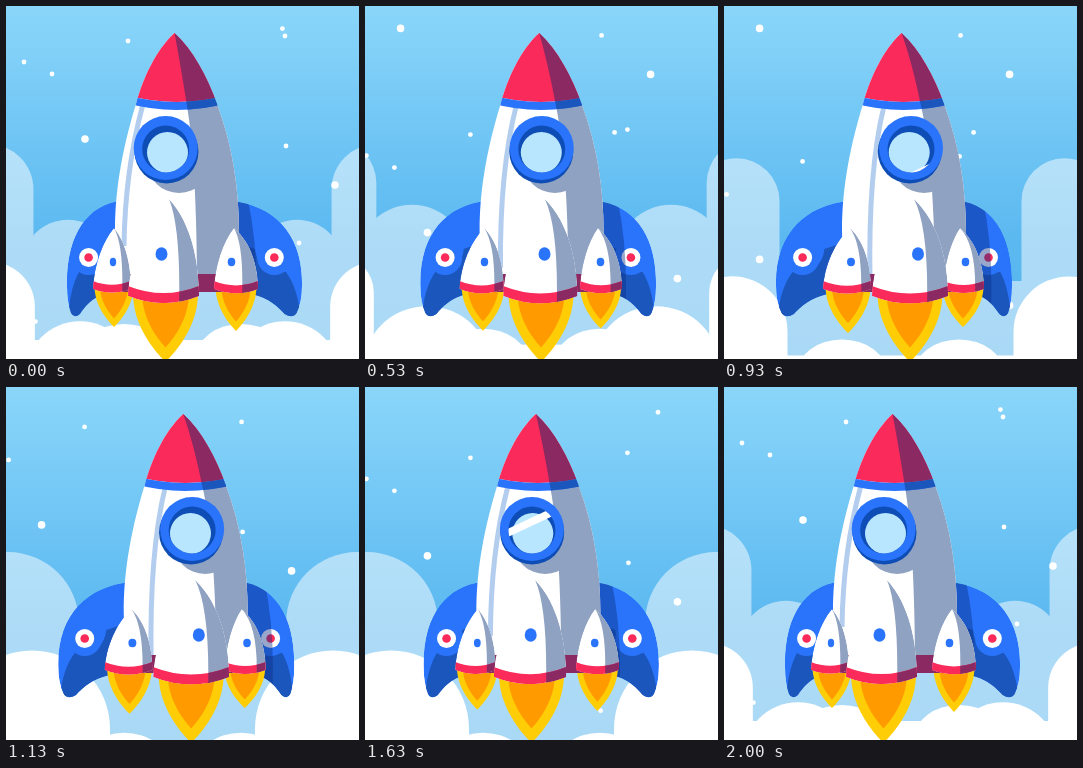
Write an HTML page that moves like this. It is 353x353 px and loops after 2030 ms.

```html
<!DOCTYPE html>
<html lang="en">
<head>
<meta charset="utf-8">
<title>Rocket</title>
<style>
  html, body { margin: 0; width: 100%; height: 100%; overflow: hidden; background: #6fc4f5; }
  svg { display: block; width: 100vw; height: 100vh; }
</style>
</head>
<body>
<svg id="stage" viewBox="0 0 353 353"></svg>
<script>
const SIZE = 353, LOOP = 2030, FRAMES = 61, CLOUD_CYCLE = 15;
const TILES = 5, TILE_HEIGHT = 231, STAR_STRIP = TILES * TILE_HEIGHT;
const C = {
  blue: '#2a74fb', navy: '#1b56bd', rim: '#0d4db5', glass: '#b9e6ff', shade: '#8fa2c2', stripe: '#b3cdef',
  red: '#fa2a5a', wine: '#8b2a62', yellow: '#ffcd05', orange: '#ff9a00', white: '#fff'
};

const lerp = (a, b, u) => a + (b - a) * u;
const ease = u => (1 - Math.cos(Math.PI * Math.min(1, Math.max(0, u)))) / 2;
const wrap = (v, n) => ((v % n) + n) % n;

const path = (d, fill, more = '') => `<path d="${d}" fill="${fill}" ${more}/>`;
const line = (d, color, width) => path(d, 'none', `stroke="${color}" stroke-width="${width}"`);
const oval = (x, y, rx, fill, ry = rx) => `<ellipse cx="${x}" cy="${y}" rx="${rx}" ry="${ry}" fill="${fill}"/>`;
const box = (y, h, fill) => `<rect y="${y}" width="${SIZE}" height="${h}" fill="${fill}"/>`;
const clip = (id, shape) => `<clipPath id="${id}">${shape}</clipPath>`;
const clipped = (id, inner) => `<g clip-path="url(#${id})">${inner}</g>`;

// One cluster of stars, repeated up the strip with a slow sway.
const cluster = [
  [279, 30, 2.4], [122, 35, 2.4], [18, 56, 2.4], [46, 68, 2.4],
  [79, 133, 3.8], [280, 140, 2.4], [329, 179, 3.8], [293, 237, 2.4]
];

function starField(shift) {
  let out = '';
  for (let tile = 0; tile < TILES; tile++) {
    const sway = 24 * (1 - Math.cos(2 * Math.PI * tile / TILES));
    for (const [x, y, r] of cluster) {
      const fall = wrap(y + sway - tile * TILE_HEIGHT + shift + 10, STAR_STRIP) - 10;
      if (fall < SIZE + 10) out += oval(x - sway, fall, r, C.white);
    }
  }
  return out;
}

// A puff swells from under the rocket and drifts up and outwards, on both sides.
function dome(x, y, r) {
  const side = cx => path(`M${cx - r},${y} A${r},${r} 0 0 1 ${cx + r},${y} V400 H${cx - r}Z`, C.white);
  return r > 0 ? side(x) + side(SIZE - x) : '';
}

function backPuff(step, delay, size, lift) {
  const age = wrap(step - delay, CLOUD_CYCLE);
  return dome(122 - 15 * age, 284 - 6 * age - lift, size * Math.sin(Math.PI * age / 18));
}

function frontPuff(step, delay, size) {
  const age = wrap(step - delay, CLOUD_CYCLE);
  return dome(122 - 12 * age, 380 - .6 * age * age, size * Math.sin(Math.PI * age / 16));
}

function backClouds(step) {
  return `<g opacity=".5">${backPuff(step, -4, 72, 0)}${backPuff(step, 2.7, 73, 0)}` +
    `${backPuff(step, 5.7, 45, 45)}${box(275, 100, C.white)}</g>`;
}

function frontClouds(step) {
  const sink = 14 * (1 - Math.cos(4 * Math.PI * step / CLOUD_CYCLE));
  return frontPuff(step, -4, 78) + frontPuff(step, 3.5, 58) +
    [118, SIZE - 118].map(x => oval(x, 352 + sink, 45, C.white, 34)).join('') + box(334 + sink, 60, C.white);
}

function flame(x, w, y, tip) {
  const drop = (half, end) => {
    const h = end - y;
    return `M${x - half},${y} C${x - half},${y + h * .45} ${x - half * .42},${y + h * .8} ${x},${end}` +
      ` C${x + half * .42},${y + h * .8} ${x + half},${y + h * .45} ${x + half},${y}Z`;
  };
  return path(drop(w, tip), C.yellow) + path(drop(w * .72, lerp(y, tip, .79)), C.orange);
}

// x, top: the tip; l, r: the base; split: where the shade meets the base
function booster(id, x, top, l, r, split, base, bandHeight) {
  const h = base - top, mid = (l + r) / 2, sag = (r - l) * .2;
  const rightEdge = `C${r},${base - h * .35} ${lerp(x, r, .75)},${top + h * .25} ${x},${top}Z`;
  const shape = `M${x},${top} C${lerp(x, l, .55)},${top + h * .22} ${l + 1},${base - h * .38} ${l},${base} ` +
    `Q${mid},${base + sag} ${r},${base} ${rightEdge}`;
  const shade = `M${x},${top} Q${split + 2},${top + h * .3} ${split},${base + sag} L${r},${base + sag} V${base} ${rightEdge}`;
  const upper = base - bandHeight;
  const band = `M${l},${upper} Q${mid},${upper + sag} ${r},${upper} V${base} Q${mid},${base + sag} ${l},${base}Z`;
  return clip(id, path(shape, C.white)) + clip(id + 'Shade', path(shade, C.white)) +
    clipped(id, path(shape, C.white) + path(shade, C.shade) + path(band, C.red) +
      clipped(id + 'Shade', path(band, C.wine)));
}

const finShape = 'M114,195 C82,199 60,228 61,280 Q61,296 65,307 Q68,313 74,308 C82,296 90,288 114,284Z';
const finShade = 'M62,312 Q64,282 73,266 Q94,268 96,243 L120,232 V320Z';

// The fin is drawn from x 61 to 108, then stretched between its outer and inner edge.
function fin(id, outer, inner, hub) {
  const k = (inner - outer) / 47;
  const place = `transform="matrix(${k} 0 0 1 ${outer - 61 * k} 0)"`;
  return clip(id, path(finShape, C.white, place)) +
    clipped(id, path(finShape, C.blue, place) + path(finShade, C.navy, place) + oval(hub, 252, 17, C.blue)) +
    oval(hub, 251.5, 9.5, C.white) + oval(hub, 251.5, 4.3, C.red);
}

function fins(mix) {
  const edge = mix(249, 266);
  return fin('leftFin', mix(61, 52), mix(108, 117), mix(82.6, 78.6)) +
    fin('rightFin', mix(296, 288), mix(233, 242), mix(268.3, 264.5)) +
    clipped('rightFin', path(`M200,190 H${edge - 8} Q${edge + 5},245 ${edge},320 H200Z`, '#0a2f80', 'opacity=".42"'));
}

function body(mix) {
  const slide = `transform="translate(${mix(0, 9)} 0)"`;
  const shape = 'M168.5,27 C150,44 137,72 130,98 C114,150 109,190 109,225 Q109,260 116,286 ' +
    'L226,286 Q233,260 233,225 C233,185 227,140 211,98 C201,70 187,44 168.5,27Z';
  const tip = mix(168.5, 177.5), split = mix(181, 197);
  const shade = `M${tip},20 V27 Q${mix(174, 188)},56 ${split},100 Q${mix(191, 211)},160 ${mix(191, 211)},290 H260 V20Z`;
  const nose = 'M120,0 H222 V89 Q170,103 120,89Z', band = 'M120,89 Q170,103 222,89 V97 Q170,111 120,97Z';
  return clip('body', path(shape, C.white, slide)) + clip('dark', path(shade, C.white)) +
    clipped('body', box(0, 300, C.white) +
      line(`M${mix(136.5, 160)},100 Q${mix(119, 144)},165 ${mix(118, 146)},${mix(240, 275)}`, C.stripe, 5) +
      path(shade, C.shade) + oval(mix(173, 200), 155, 32, C.shade) +
      path(nose, C.red, slide) + path(band, C.blue, slide) +
      clipped('dark', path(nose, C.wine, slide) + path(band, C.navy, slide)) + box(268, 30, C.wine));
}

function porthole(mix, t) {
  const x = mix(159.7, 187);
  const pass = [795, 1675].map(middle => t - middle).find(d => Math.abs(d) < 180);
  const y = 143 + pass / 5;
  const glint = pass === undefined ? '' : line(`M${x - 30},${y + 14} L${x + 30},${y - 14}`, C.white, 7.5);
  return clip('pane', oval(x, 143, 23.5, C.white)) +
    oval(x + mix(.8, -1.2), 145.5, 32, C.rim) + oval(x, 142, 32, C.blue) + oval(x, 143, 23.5, C.rim) +
    clipped('pane', oval(x + mix(1.8, -1.8), 146.5, 20.5, C.glass) + glint);
}

function rocket(turn, t) {
  const mix = (a, b) => lerp(a, b, turn);
  return fins(mix) +
    flame(mix(108, 124), mix(19.5, 22.5), 280, mix(321, 327)) +
    flame(mix(230, 239), 20.5, 280, mix(325, 321)) +
    flame(mix(159.5, 186), 32.5, 287, 356) +
    body(mix) + porthole(mix, t) +
    booster('left', mix(108, 126), 222, mix(87, 99), mix(125, 147), mix(116, 137), 283, 8) +
    booster('right', mix(228, 236), 222, mix(208, 219), mix(252, 260), mix(236, 251), 283, 8) +
    booster('centre', mix(163, 190), 193, mix(122, 148), mix(193, 224), mix(173, 203), 290, 10) +
    oval(mix(107, 127), 256, mix(3.2, 4), C.blue, 4.2) +
    oval(mix(225.5, 241.5), 256, 3.8, C.blue, 4.2) +
    oval(mix(155.5, 194), 248, 6, C.blue, 6.8);
}

const sky = '<linearGradient id="sky" x2="0" y2="1"><stop stop-color="#8ad6fa"/>' +
  '<stop offset=".65" stop-color="#5cb9f0"/><stop offset="1" stop-color="#54b3ee"/></linearGradient>';
const stage = document.getElementById('stage');

function draw(now) {
  const step = Math.min(FRAMES - 1, Math.floor((now % LOOP + 4) / (LOOP / FRAMES)));
  const t = step * 100 / 3;
  const turn = t < 980 ? ease(t / 920) : 1 - ease((t - 1030) / 920);
  stage.innerHTML = sky + box(0, SIZE, 'url(#sky)') + backClouds(step) +
    starField(step * STAR_STRIP / (FRAMES - 1)) + frontClouds(step) + rocket(turn, t);
}

const start = performance.now();
function tick() {
  draw(performance.now() - start);
  requestAnimationFrame(tick);
}
tick();
</script>
</body>
</html>
```
